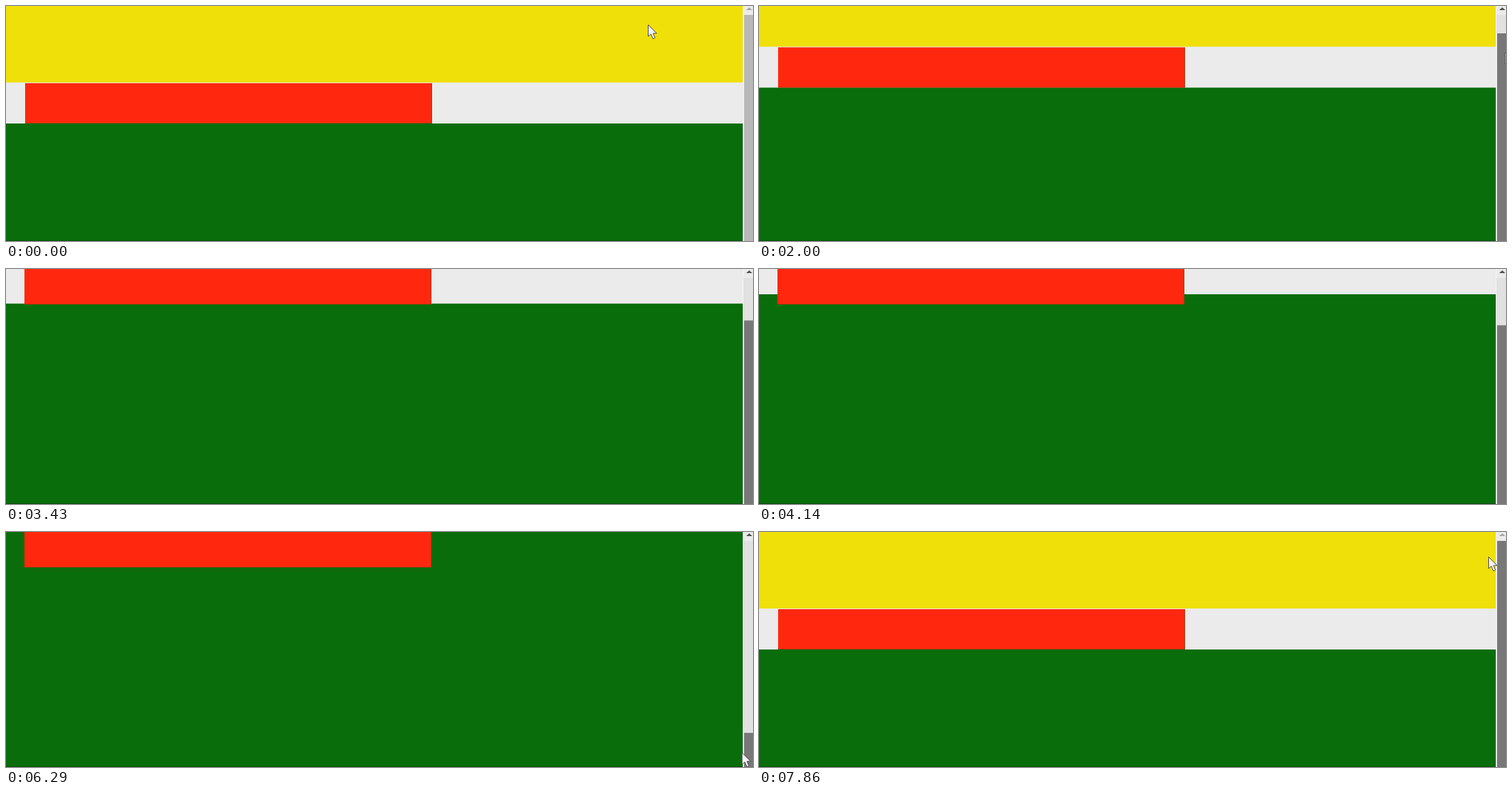
Animation, 1094 px wide and 344 px high, one loop 8000 ms. Source, as an HTML page without scripts:

```html
<!DOCTYPE html>
<html lang="en">
<head>
<meta charset="utf-8">
<title>Sticky bar while scrolling</title>
<style>
  @property --scroll { syntax: "<length>"; inherits: true; initial-value: 0px; }
  @property --x { syntax: "<length>"; inherits: true; initial-value: 940px; }
  @property --y { syntax: "<length>"; inherits: true; initial-value: 27px; }

  html, body { margin: 0; width: 100%; height: 100%; overflow: hidden; }

  /* 56 ticks per loop; each keyframe sits on a tick and steps once per tick */
  body {
    position: relative;
    background: #ebebeb;
    animation: drag 8s -5ms infinite;
  }
  body *, body::after { position: absolute; }

  /* dark hairline along the lower edge of the page */
  body::after { content: ""; left: 0; bottom: 0; width: 1079px; height: 1px; background: #064f08; }

  .page { inset: 0 auto 0 0; width: 1079px; overflow: hidden; }
  .head, .main { left: 0; width: 100%; transform: translateY(calc(-1 * var(--scroll))); }
  .head { top: 0; height: 112px; background: #efe009; }
  .main { top: 172px; height: 1000px; background: #096d0c; }
  .bar {
    left: 28px; top: 113px; width: 596px; height: 59px;
    background: #ff280e;
    box-shadow: inset -1px -1px #a83a10;
    transform: translate(
      clamp(-1px, 120px - var(--scroll), 0px),
      max(-120px, -1 * var(--scroll)));
  }

  .scrollbar { inset: 0 0 0 1079px; overflow: hidden; background: #e1e1e1; box-shadow: inset 1px 0 #f4f4f4; }
  .button { left: 1px; top: 0; width: 14px; height: 13px; background: #ebebeb; }
  .arrow {
    left: 5px; top: 2px; width: 9px; height: 4px;
    clip-path: polygon(50% 0, 100% 100%, 0 100%);
    animation: arrow 8s -5ms step-end infinite;
  }
  .thumb {
    left: 0; top: 13px; width: 15px; height: 400px;
    box-sizing: border-box;
    border-left: 2px solid #f0f0f0;
    background-clip: padding-box;
    transform: translateY(calc(.514 * var(--scroll)));
    animation: press 8s -5ms step-end infinite;
  }

  .cursor {
    left: 0; top: 0; width: 15px; height: 23px;
    overflow: visible;
    transform: translate(var(--x), var(--y));
    fill: #f4f4f4; stroke: #4a4450; stroke-linejoin: round;
  }

  @keyframes drag {
    0%      { --scroll: 0px;   --x: 940px;  --y: 27px;  animation-timing-function: step-end; }
    1.786%  { --scroll: 0px;   --x: 940px;  --y: 27px;  animation-timing-function: steps(9); }
    17.857% { --scroll: 0px;   --x: 1088px; --y: 40px;  animation-timing-function: steps(8); }
    32.143% { --scroll: 105px; --x: 1097px; --y: 95px;  animation-timing-function: steps(11); }
    51.786% { --scroll: 135px; --x: 1096px; --y: 111px; animation-timing-function: steps(5); }
    60.714% { --scroll: 220px; --x: 1088px; --y: 155px; animation-timing-function: steps(3); }
    66.071% { --scroll: 323px; --x: 1081px; --y: 209px; animation-timing-function: steps(4); }
    73.214% { --scroll: 515px; --x: 1079px; --y: 307px; animation-timing-function: steps(4); }
    80.357% { --scroll: 556px; --x: 1077px; --y: 328px; animation-timing-function: steps(4); }
    87.5%   { --scroll: 420px; --x: 1074px; --y: 248px; animation-timing-function: steps(2); }
    91.071% { --scroll: 181px; --x: 1065px; --y: 115px; animation-timing-function: steps(3); }
    96.429% { --scroll: 0px;   --x: 1067px; --y: 42px;  animation-timing-function: steps(1); }
    98.214%, 100% { --scroll: 0px; --x: 1068px; --y: 36px; animation-timing-function: step-end; }
  }
  @keyframes press {
    0% { background-color: #b8b8b8; }
    17.857%, 100% { background-color: #787878; }
  }
  @keyframes arrow {
    0%, 96.429%, 100% { background: #a6a6a6; }
    19.643% { background: #505050; }
  }
</style>
</head>
<body>
  <div class="page">
    <div class="head"></div>
    <div class="main"></div>
    <div class="bar"></div>
  </div>
  <div class="scrollbar">
    <div class="button"></div>
    <div class="arrow"></div>
    <div class="thumb"></div>
  </div>
  <svg class="cursor" viewBox="0 0 15 23">
    <path d="M.5.5V17.5L4.5 14 7.5 21 10.5 19.8 7.7 13H13Z"/>
  </svg>
</body>
</html>
```
